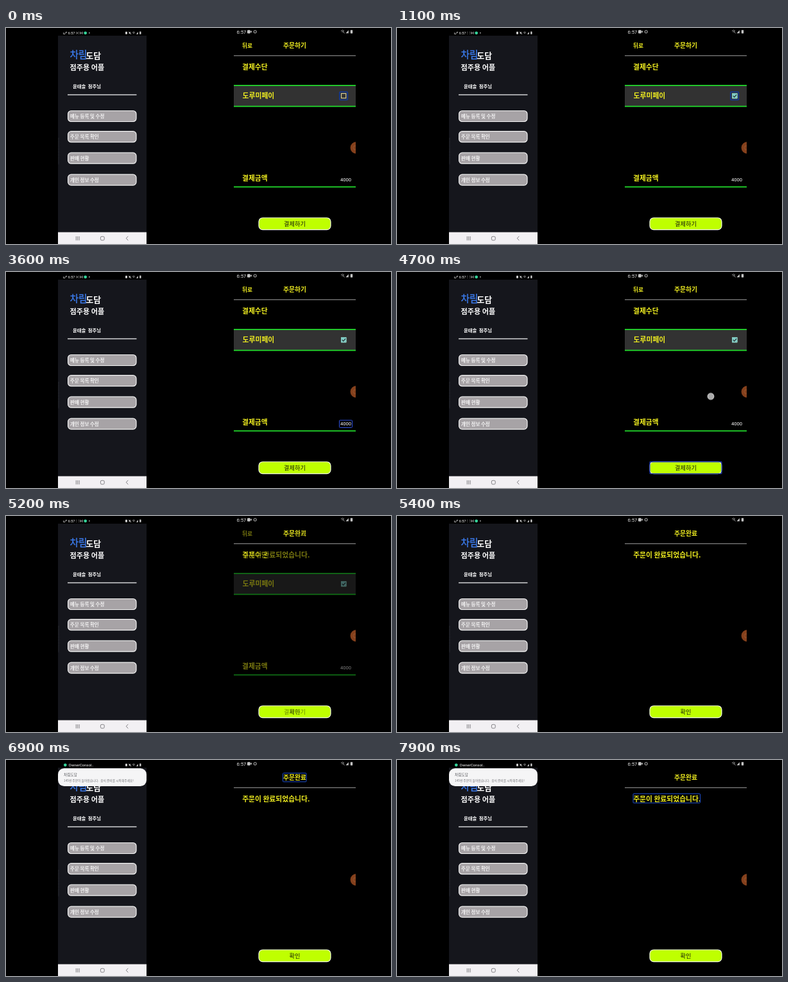
An HTML page that plays this animation: 600 by 338 pixels, repeating every 8 s.

```html
<!DOCTYPE html>
<html>
<head>
<meta charset="utf-8">
<title>Order demo</title>
<style>
html, body { margin: 0; width: 100%; height: 100%; overflow: hidden; background: #000; }
svg { display: block; width: 600px; height: 338px; }
text { font-family: "Noto Sans CJK KR", "Noto Sans KR", "Noto Sans CJK JP", sans-serif; fill: #fff; white-space: pre; }
.num { font-family: Roboto, sans-serif; }
.b { font-weight: 700; }
.y text { fill: #f0ee20; font-size: 10.8px; font-weight: 700; }
.mid { text-anchor: middle; }
.y .head { font-size: 9.8px; }
.y .price { fill: #fff; font-size: 7.6px; font-weight: 400; }
.menu rect { fill: #a7a3a6; stroke: #f4f4f4; stroke-width: 1.2; }
.menu text { font-size: 7.5px; stroke: #fff; stroke-width: .2; }
.cta { fill: #bfff00; stroke: #f4ffe0; stroke-width: 1.2; }
.y .label { fill: #16180a; font-size: 9.2px; font-weight: 400; text-anchor: middle; }
.line { fill: none; stroke: #d0d0d0; stroke-width: .7; }

/* everything shares one 8 s loop */
.anim { animation: 8s linear infinite; }
.step { animation-timing-function: step-end; }

.check { animation-name: check; }
@keyframes check { 0% { opacity: 0 } 8.75%, 100% { opacity: 1 } }

.blink { animation-name: blink; }
@keyframes blink {
  0% { opacity: 1 } 13.75% { opacity: 0 } 18.75% { opacity: 1 }
  30% { opacity: 0 } 45% { opacity: 1 } 55%, 100% { opacity: 0 }
}

.focus { fill: none; stroke: #2f50dc; stroke-width: 1; animation-name: focus; }
@keyframes focus {
  0% { x: 519.8px; y: 100px; width: 12.6px; height: 12.4px; stroke: #123a9c; stroke-width: 1.5px; }
  26% { x: 368px; y: 227.5px; width: 39.5px; height: 14.5px; stroke: #2f50dc; stroke-width: 1px; }
  40% { x: 519.5px; y: 232px; width: 20px; height: 11.5px; stroke: #2f50dc; stroke-width: 1px; }
  52.5% { x: 394px; y: 297px; width: 112px; height: 18.6px; stroke: #1f3cae; stroke-width: 1.3px; }
  63.75% { x: 394px; y: 297px; width: 0; height: 0; stroke: #2f50dc; stroke-width: 0; }
  77.5% { x: 431.5px; y: 20.5px; width: 36.5px; height: 13.5px; stroke: #1d4fd0; stroke-width: 1px; }
  97.25%, 100% { x: 368px; y: 52.8px; width: 104.5px; height: 14.4px; stroke: #1d4fd0; stroke-width: 1px; }
}

.done { animation-name: done; }
@keyframes done { 0%, 63.75% { opacity: 0 } 66.25%, 100% { opacity: 1 } }

.bar-a { animation-name: barA; }
.bar-b { animation-name: barB; }
@keyframes barA { 0% { opacity: 1 } 76.25%, 100% { opacity: 0 } }
@keyframes barB { 0% { opacity: 0 } 76.25%, 100% { opacity: 1 } }

.card { animation-name: card; }
@keyframes card {
  0%, 76.25% { x: 89px; y: 4px; width: 40px; height: 10px; rx: 5px; }
  78.75% { x: 83.5px; y: 10.3px; width: 98.8px; height: 23.4px; rx: 10.5px; animation-timing-function: ease-out; }
  83.75%, 100% { x: 81px; y: 13px; width: 138px; height: 28px; rx: 9.5px; }
}
.alert { animation-name: alert; }
@keyframes alert { 0%, 76.25% { opacity: 0 } 78.5%, 100% { opacity: 1 } }
.copy { animation-name: copy; }
@keyframes copy {
  0%, 76.25% { transform: translateY(-9px) }
  78.75% { transform: translateY(-2.8px); animation-timing-function: ease-out }
  83.75%, 100% { transform: none }
}

/* finger gestures, placed in the loop by their delay */
.touch { fill: #a9a9a9; stroke: #c9c9c9; stroke-width: 1.3; opacity: 0; }
.swipe { animation-name: swipe; }
@keyframes swipe {
  0% { opacity: 1; transform: translate(470px, 193px); animation-timing-function: ease-in-out }
  4.4% { opacity: 1; transform: translate(521px, 214px) }
  6.25%, 100% { opacity: 0; transform: translate(521px, 214px) }
}
.tap { animation-name: tap; transform: translate(489px, 194.6px); }
@keyframes tap { 0% { opacity: 1 } 1.75% { opacity: 0 } 2.75% { opacity: 1 } 4.5%, 100% { opacity: 0 } }
</style>
</head>
<body>
<svg viewBox="0 0 600 338">
  <defs>
    <clipPath id="cardClip"><rect class="anim card"/></clipPath>
    <clipPath id="screen"><rect x="355" width="190" height="338"/></clipPath>
  </defs>
  <rect width="600" height="338"/>

  <!-- owner's phone -->
  <rect x="81" y="12" width="138" height="307.5" fill="#15161c"/>
  <rect x="81" y="319.5" width="138" height="18.5" fill="#f2f0f3"/>
  <g fill="none" stroke="#77757a" stroke-width=".9">
    <path d="M109.3 326v6.4M111.7 326v6.4M114.1 326v6.4M190.3 325.8l-3 3.3 3 3.3"/>
    <rect x="147.4" y="326.3" width="5.8" height="5.8" rx="1.6"/>
  </g>
  <path d="M82 172v41" stroke="#30323a" stroke-dasharray="1.5 1"/>

  <g class="anim step bar-a">
    <path class="line" d="M89.5 7v2.5h2.5V7"/>
    <circle class="line" cx="94" cy="6.8" r=".8"/>
    <text class="num" x="96.8" y="9.8" font-size="5.4">6:57</text>
    <path class="line" d="M109.5 6v1M109.5 8.6v1M113 6v1M113 8.6v1M115.6 5.8v4M119.2 5.8v4M116.5 6.8l1.8 2M118.3 6.8l-1.8 2"/>
    <path class="line anim step blink" d="M110.3 6.8l1.9 2M112.2 6.8l-1.9 2"/>
    <circle cx="123.7" cy="7.8" r="2.4" fill="#35d39a"/>
    <circle cx="129.9" cy="7.8" r=".8" fill="#fff"/>
  </g>
  <g class="anim step bar-b">
    <circle cx="92.3" cy="7.8" r="2.4" fill="#35d39a"/>
    <text class="num" x="97.5" y="9.8" font-size="6">OwnerConsol..</text>
  </g>
  <g fill="#d0d0d0">
    <rect x="186" y="5.8" width="3" height="4" rx=".8"/>
    <path d="M191.4 7h1l1.4-1.2v4l-1.4-1.2h-1z"/>
    <path class="line" d="M191.2 5.6l4 4.4M197 7.2q2-2 4 0M198 8.6q1-1 2 0"/>
    <path d="M203 9.8l2.8-3.8v3.8z"/>
    <rect x="208.2" y="5.6" width="2.3" height="4.2" rx=".5"/>
  </g>

  <text x="99.7" y="47.3" font-size="14.6" style="fill:#3c7df0;stroke:#3c7df0;stroke-width:.4">차림</text>
  <text class="b" x="124.5" y="47.6" font-size="12.8">도담</text>
  <text class="b" x="99.6" y="66.2" font-size="11.1">점주용 어플</text>
  <text class="b" x="104" y="94.4" font-size="7.4">윤태솔  점주님</text>
  <path d="M96 104.5h107.5" stroke="#d6d6d8" stroke-width="1.3"/>
  <g class="menu">
    <rect x="96.6" y="129.5" width="106.4" height="17" rx="5"/><text x="100" y="140.9">메뉴 등록 및 수정</text>
    <rect x="96.6" y="161.7" width="106.4" height="17" rx="5"/><text x="100" y="173.1">주문 목록 확인</text>
    <rect x="96.6" y="195.2" width="106.4" height="17" rx="5"/><text x="100" y="206.6">판매 현황</text>
    <rect x="96.6" y="229.1" width="106.4" height="17" rx="5"/><text x="100" y="240.5">개인 정보 수정</text>
  </g>

  <g class="anim alert">
    <rect class="anim card" fill="#f5f5f6"/>
    <g clip-path="url(#cardClip)">
      <g class="anim copy">
        <text x="90" y="25.2" font-size="5.7" style="fill:#55565a">차림도담</text>
        <text x="90" y="34" font-size="4.75" style="fill:#77787c">145번 주문이 들어왔습니다.  음식 준비를 시작해주세요!</text>
      </g>
    </g>
  </g>

  <!-- customer's phone -->
  <g clip-path="url(#screen)">
    <text class="num" x="359.6" y="8.6" font-size="7.6" style="fill:#e4e4e4">6:57</text>
    <g fill="#c4c4c4">
      <rect x="376" y="3.2" width="4.8" height="5.2" rx="1.2"/>
      <path d="M380.5 5.8l2.4-1.8v3.6z"/>
      <circle cx="388.2" cy="5.8" r="2" fill="none" stroke="#888" stroke-width="1.3"/>
      <path class="line" d="M522 4.6q2.5-2.4 5 0M523.2 6.2q1.3-1.2 2.6 0M525 5l2.4 3.4"/>
      <path d="M529.4 8.3l4.4-4.8v4.8z"/>
      <rect x="536.8" y="3.2" width="3.4" height="5.2" rx=".6"/>
    </g>

    <g class="y">
      <text x="368" y="30.6" style="font-size:8.7px">뒤로</text>
      <text class="head mid" x="450" y="31.3">주문하기</text>
      <path d="M355 43.4h190" stroke="#808080" stroke-width="1.4"/>
      <text x="368" y="64.5">결제수단</text>
      <rect x="355" y="90" width="190" height="33" fill="#323232"/>
      <path d="M355 89.8h190M355 122.7h190M355 248.7h190" stroke="#22dd2c" stroke-width="1.7"/>
      <text x="368.6" y="110.3">도루미페이</text>
      <rect x="522.6" y="102.5" width="7.2" height="7.2" fill="none" stroke="#e0d8a0" stroke-width="1.1"/>
      <g class="anim step check">
        <rect x="522" y="102" width="8.6" height="8.4" rx="1" fill="#80cbc4"/>
        <path d="M523.8 106.2l1.9 1.9 3.4-3.8" fill="none" stroke="#1f2a2a" stroke-width="1.1"/>
      </g>
      <text x="368" y="239">결제금액</text>
      <text class="num price" x="521" y="240.2">4000</text>
      <rect class="cta" x="394" y="297" width="112" height="18.6" rx="6"/>
      <text class="label" x="450" y="309.8">결제하기</text>
    </g>

    <g class="y anim done">
      <rect x="355" y="13" width="191" height="325"/>
      <text class="head mid" x="450" y="31.3">주문완료</text>
      <path d="M355 43.4h190" stroke="#808080" stroke-width="1.4"/>
      <text x="368.2" y="64.5">주문이 완료되었습니다.</text>
      <rect class="cta" x="394" y="297" width="112" height="18.6" rx="6"/>
      <text class="label" x="450" y="309.8">확인</text>
    </g>

    <rect class="anim step focus" rx="1"/>
    <circle cx="546" cy="187.4" r="9.4" fill="#84401c"/>
    <circle cx="544" cy="187.4" r="3" fill="none" stroke="#985a34" stroke-width=".8"/>

    <circle class="touch anim step tap" r="4.8" style="animation-delay:-7800ms"/>
    <circle class="touch anim step tap" r="4.8" style="animation-delay:-3320ms"/>
    <circle class="touch anim swipe" r="4.8" style="animation-delay:-6320ms"/>
    <circle class="touch anim swipe" r="4.8" style="animation-delay:-5220ms"/>
    <circle class="touch anim swipe" r="4.8" style="animation-delay:-4220ms"/>
    <circle class="touch anim swipe" r="4.8" style="animation-delay:-2180ms"/>
    <circle class="touch anim swipe" r="4.8" style="animation-delay:-620ms"/>
  </g>
</svg>
</body>
</html>
```
